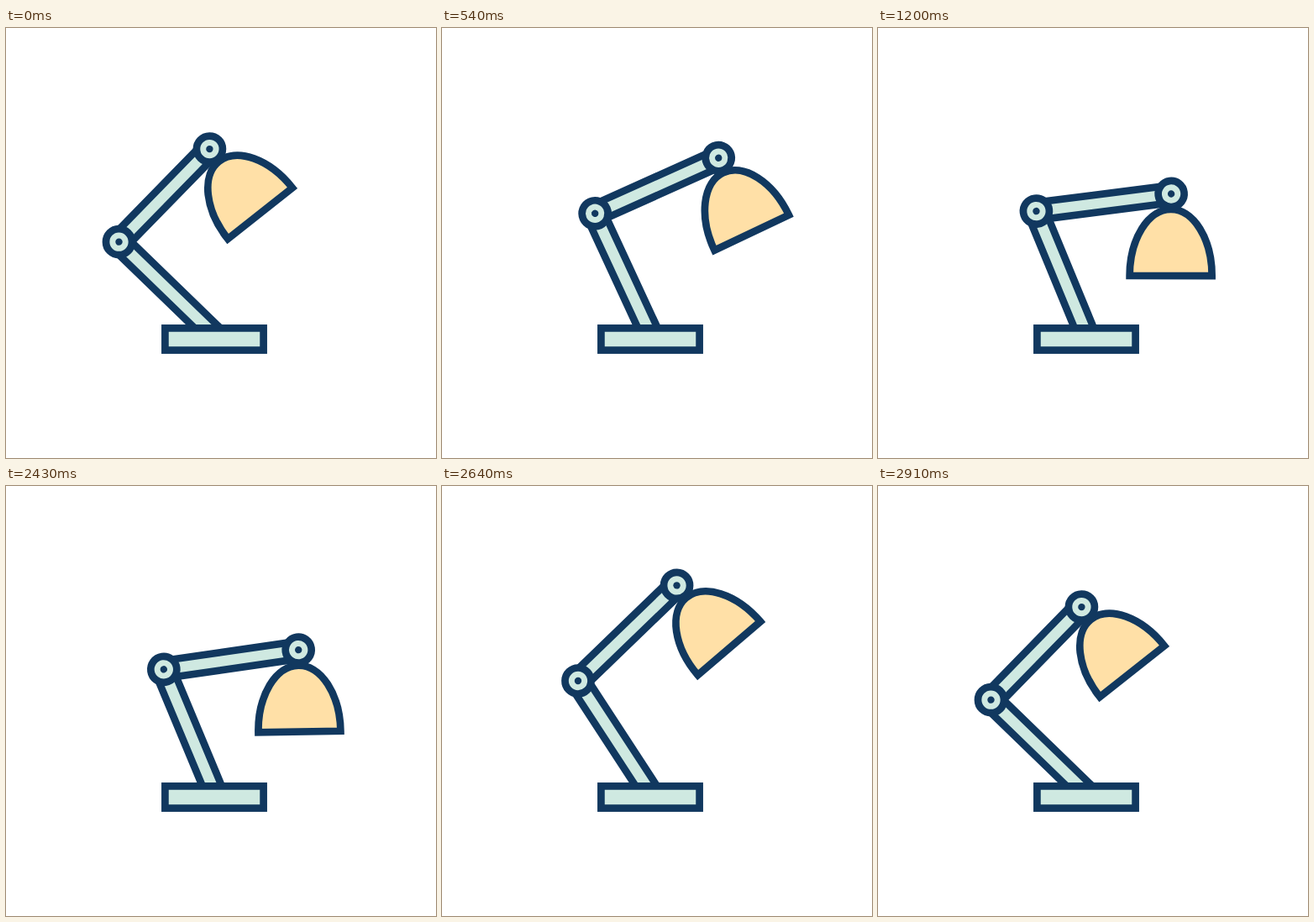
An HTML page that plays this animation: 512 by 512 pixels, repeating every 3600 ms.

```html
<!DOCTYPE html>
<html lang="en">
<head>
<meta charset="utf-8">
<title>Desk lamp</title>
<style>
  html, body { margin: 0; height: 100%; overflow: hidden; background: #fff; }
  svg { display: block; width: 100vw; height: 100vh; }
  .line { fill: #cfe9e1; stroke: #11385f; stroke-width: 8.7; }
  .shade { fill: #ffe0a7; }
  .dot { fill: #11385f; }
</style>
</head>
<body>
<svg viewBox="0 0 512 512">
  <defs>
    <g id="joint">
      <circle class="line" r="15.5"/>
      <circle class="dot" r="4.2"/>
    </g>
  </defs>
  <g id="lower">
    <rect class="line" x="-11" y="-160" width="21.3" height="160"/>
    <g id="upper">
      <rect id="arm" class="line" y="-10.3" height="21"/>
      <path id="shade" class="line shade" d="M-49 82.8A49 79 0 0 1 49 82.8Z"/>
      <use href="#joint"/>
      <use id="head" href="#joint"/>
    </g>
  </g>
  <rect class="line" x="189.4" y="357.4" width="117.2" height="26.2"/>
</svg>
<script>
const LOOP = 3600, STEP = 30;

const $ = id => document.getElementById(id);
const set = (id, transform) => $(id).setAttribute("transform", transform);

// Eased progress from 0 to 1 between two times.
function ramp(t, from, to) {
  const x = Math.min(1, Math.max(0, (t - from) / (to - from)));
  return x * x * (3 - 2 * x);
}

function draw(t) {
  const reach = ramp(t, 300, 600);
  const bow = ramp(t, 900, 1200);
  const back = ramp(t, 2400, 2910);
  const rise = ramp(t, 2400, 2760);
  const fold = ramp(t, 2760, 2910);

  // Counterclockwise degrees, each relative to the part it hangs on.
  const lower = 45.9 - 23.5 * (reach - back);
  const upper = -0.2 - 0.5 * reach - 14.4 * bow + 35.1 * rise - 20.2 * fold;
  const tilt = -7.4 + 9.6 * (reach - bow) + 5.3 * (rise - fold);
  const length = 154.5 + 7.5 * reach + 2 * rise - 9.5 * fold;

  set("lower", `translate(249.4 366) rotate(${-lower})`);
  set("upper", `translate(0 -160) rotate(${-upper})`);
  $("arm").setAttribute("width", length);
  set("head", `translate(${length} 0)`);
  set("shade", `translate(${length - 2.2} 14.5) rotate(${-tilt})`);
}

let start;
function tick(now) {
  start ??= now;
  draw(Math.floor((now - start) % LOOP / STEP) * STEP);
  requestAnimationFrame(tick);
}
draw(0);
requestAnimationFrame(tick);
</script>
</body>
</html>
```
